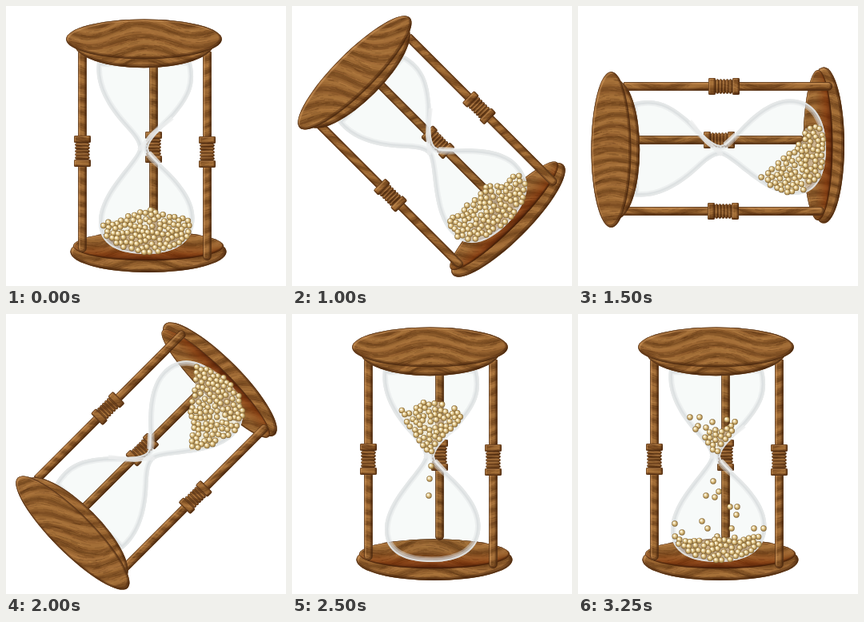
Animation of 350x350 px, one loop 3750 ms. Source, as an HTML page with a canvas:

```html
<!DOCTYPE html>
<html lang="en">
<head>
<meta charset="utf-8">
<title>Hourglass</title>
<style>
html, body { margin: 0; width: 100%; height: 100%; overflow: hidden; background: #fff; }
canvas { display: block; width: 350px; height: 350px; }
</style>
</head>
<body>
<canvas id="stage" width="350" height="350"></canvas>
<script>
const SIZE = 350, LOOP = 3750, MID = 176;
const ctx = document.getElementById('stage').getContext('2d');

// Each scene: start time, turn in degrees, outlines of packed sand, loose grains.
const scenes = [
  { at: 0, turn: 0, piles: ['M119 272 L146 265 L168 256 L183 252 L200 262 L218 264 L234 270 L230 287 L207 304 L178 309 L146 303 L126 288Z'], loose: [] },
  { at: 1000, turn: -45, piles: ['M193 270 L213 254 L232 238 L243 224 L264 224 L284 207 L293 222 L289 243 L272 267 L246 287 L224 293 L206 289Z'], loose: [] },
  { at: 1500, turn: -90, piles: ['M229 214 L246 200 L264 183 L282 167 L284 153 L303 148 L309 168 L308 191 L300 213 L282 231 L262 234 L243 226Z'], loose: [] },
  { at: 2000, turn: -135, piles: ['M237 66 L253 66 L274 80 L291 100 L297 124 L288 145 L267 159 L247 168 L230 171 L234 140 L230 118 L236 90Z'], loose: [] },
  { at: 2500, turn: 0, piles: ['M135 120 L152 120 L165 110 L188 110 L193 123 L213 123 L207 136 L186 158 L174 175 L161 164 L146 141Z'],
    loose: [[203, 118], [174, 190], [172, 206], [171, 227]] },
  { at: 3250, turn: 0, piles: [
      'M157 152 L168 143 L181 144 L198 131 L192 148 L182 163 L172 175 L164 164Z',
      'M120 277 L145 283 L165 282 L193 279 L211 281 L227 275 L226 291 L206 304 L178 309 L148 303 L126 289Z'],
    loose: [[140, 129], [152, 129], [150, 140], [160, 142], [168, 135], [186, 132], [147, 144],
      [169, 209], [160, 227], [171, 229], [176, 222], [190, 241], [199, 241], [198, 251],
      [155, 259], [121, 262], [192, 268], [162, 268], [220, 268], [232, 268], [130, 273], [174, 278]] }
];

let seed = 1;
const rand = () => (seed = seed * 16807 % 2147483647) / 2147483647;

function ellipse(x, y, rx, ry) {
  const p = new Path2D();
  p.ellipse(x, y, rx, ry, 0, 0, 7);
  return p;
}

function box(x, y, w, h, r) {
  const p = new Path2D();
  p.roundRect(x, y, w, h, r);
  return p;
}

// Grain stays level on the stage however the hourglass is turned.
function makeWood() {
  const canvas = document.createElement('canvas');
  canvas.width = canvas.height = SIZE;
  const c = canvas.getContext('2d');
  const bow = x => -8 * Math.cos((x - 45) / 127 * 2 * Math.PI);
  c.fillStyle = '#96622f';
  c.fillRect(0, 0, SIZE, SIZE);
  function streak(x0, x1, y, color, width) {
    c.beginPath();
    for (let x = x0; x <= x1; x += 4) c.lineTo(x, y + bow(x) + 1.5 * Math.sin(x / 17 + y / 11));
    c.strokeStyle = color;
    c.lineWidth = width;
    c.stroke();
  }
  for (let y = -10; y < SIZE + 10; y += 2.5) {
    const band = Math.sin(y / 2.4 + 2 * Math.sin(y / 31));
    streak(0, SIZE, y, band > 0 ? `rgba(75,40,12,${0.33 * band})` : `rgba(205,150,85,${-0.25 * band})`, 3);
  }
  for (let i = 0; i < 5000; i++) {
    const x = SIZE * rand();
    streak(x, x + 6 + 10 * rand(), SIZE * rand(), rand() < 0.6 ? 'rgba(70,36,12,.25)' : 'rgba(205,150,90,.22)', 0.8);
  }
  return canvas;
}
const wood = makeWood();

// A wooden part, lit from the upper left of the stage.
function carve(path, depth = 2, tint) {
  const m = ctx.getTransform();
  ctx.save();
  ctx.clip(path);
  ctx.resetTransform();
  ctx.drawImage(wood, 0, 0);
  function edge(shift, color, width) {
    ctx.setTransform(m.a, m.b, m.c, m.d, m.e + shift, m.f + shift);
    ctx.strokeStyle = color;
    ctx.lineWidth = width;
    ctx.stroke(path);
  }
  ctx.setTransform(m);
  if (tint) {
    ctx.fillStyle = tint;
    ctx.fill(path);
  }
  edge(depth / 2, 'rgba(222,165,105,.4)', depth);
  edge(-depth / 2, 'rgba(65,32,8,.4)', depth * 1.6);
  edge(-depth / 4, 'rgba(50,24,6,.4)', depth * 0.8);
  edge(0, 'rgba(80,44,16,.5)', 1.4);
  ctx.restore();
}

function post(x, bottom, knob) {
  carve(box(x - 5.2, 57, 10.4, bottom - 57, [1, 1, 5, 5]), 2.4);
  carve(box(x - 7.5, knob + 7, 15, 25, 1), 2);
  for (let i = 0; i < 5; i++) carve(box(x - 9, knob + 9.5 + i * 4.1, 18, 3.6, 1.6), 1.2);
  for (const y of [knob, knob + 30]) carve(box(x - 10.5, y, 21, 9, 2), 2);
}

function base() {
  carve(ellipse(178, 307.3, 97.5, 25.7), 3);
  const well = ctx.createLinearGradient(0, 296, 0, 319);
  well.addColorStop(0, 'rgba(110,40,0,0)');
  well.addColorStop(0.6, 'rgba(125,40,0,.5)');
  well.addColorStop(1, 'rgba(60,14,0,.8)');
  carve(ellipse(178, 300, 94, 18.5), 1.6, well);
}

function lid() {
  carve(ellipse(172.5, 47.5, 87, 29.7), 3);
  carve(ellipse(172.5, 41.5, 97.3, 25), 2.6);
}

const glass = new Path2D('M114 70C110 100 128 128 147 149C158 161 167 171 165 180C159 197 117 232 116 268C115 301 144 310 175 310C208 310 236 297 235.500 264C235 238 212 214 193 197C184 189 179 184 178 178C179 165 199 151 212 136C228 117 240 98 231 68Z');
const glint = new Path2D('M208 140C199 148 188 155 181 162L166 180M192 197L179 183');

function glassFill() {
  ctx.save();
  ctx.globalCompositeOperation = 'multiply';
  ctx.fillStyle = '#f7faf9';
  ctx.fill(glass);
  ctx.restore();
}

function glassEdge() {
  ctx.save();
  ctx.clip(glass);
  for (const [color, width] of [['rgba(222,225,226,.45)', 13], ['rgba(208,212,213,.5)', 9], ['rgba(232,234,234,.8)', 4]]) {
    ctx.strokeStyle = color;
    ctx.lineWidth = width;
    ctx.stroke(glass);
  }
  ctx.restore();
  ctx.strokeStyle = 'rgba(236,238,238,.75)';
  ctx.lineWidth = 5;
  ctx.stroke(glint);
}

// Fill an outline with grains that keep a least distance.
function pack(area) {
  const grains = [];
  seed = 77;
  for (let i = 0; i < 25000; i++) {
    const x = 110 + 205 * rand(), y = 60 + 255 * rand();
    if (ctx.isPointInPath(area, x, y) && grains.every(g => Math.hypot(g[0] - x, g[1] - y) > 5.4)) grains.push([x, y]);
  }
  return grains;
}

function bead([x, y]) {
  const g = ctx.createRadialGradient(x - 1.2, y - 1.3, 0.3, x, y, 3.8);
  g.addColorStop(0, '#fffdf0');
  g.addColorStop(0.35, '#ead6a4');
  g.addColorStop(0.7, '#bd9c5c');
  g.addColorStop(1, '#73572c');
  ctx.fillStyle = g;
  ctx.fill(ellipse(x, y, 3.7, 3.7));
}

for (const s of scenes) {
  s.piles = s.piles.map(d => new Path2D(d));
  s.beads = [...s.piles.flatMap(pack), ...s.loose].sort((a, b) => a[1] - b[1]);
}

function turned(degrees, paint) {
  ctx.save();
  ctx.translate(MID, MID);
  ctx.rotate(degrees * Math.PI / 180);
  ctx.translate(-MID, -MID);
  paint();
  ctx.restore();
}

function draw(scene) {
  ctx.fillStyle = '#fff';
  ctx.fillRect(0, 0, SIZE, SIZE);
  turned(scene.turn, () => {
    base();
    post(184.5, 283, 157);
    glassFill();
    glassEdge();
  });
  ctx.fillStyle = 'rgba(236,226,200,.6)';
  scene.piles.forEach(p => ctx.fill(p));
  scene.beads.forEach(bead);
  turned(scene.turn, () => {
    post(95.5, 308, 162);
    post(251.5, 318, 163);
    lid();
  });
}

const start = performance.now();
let shown;
function tick() {
  const t = (performance.now() - start) % LOOP;
  const scene = scenes.findLast(s => s.at <= t);
  if (scene !== shown) draw(shown = scene);
  requestAnimationFrame(tick);
}
tick();
</script>
</body>
</html>
```
